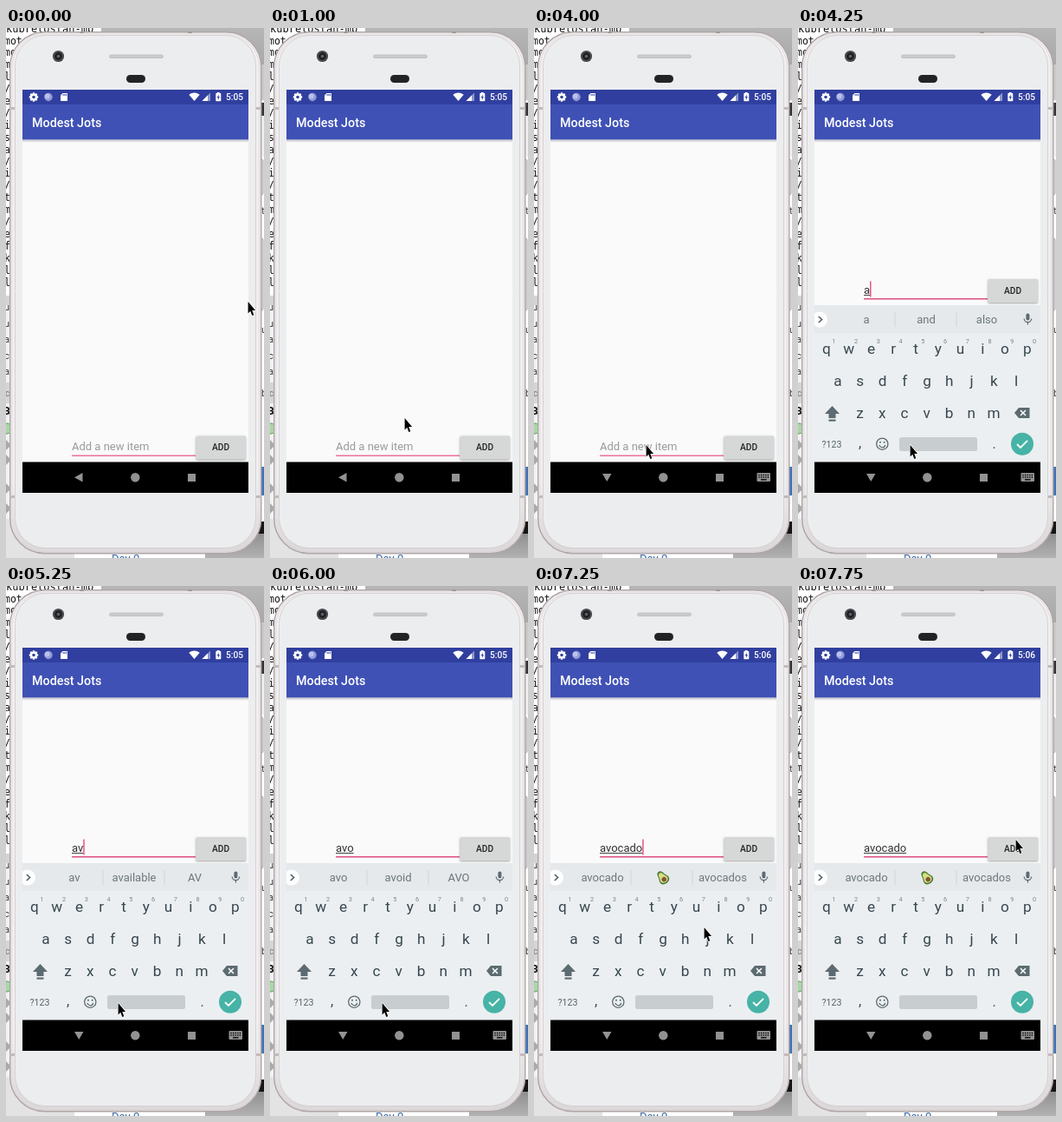
An HTML page with a canvas that plays this animation: 298x610 px, repeating every 8000 ms.

```html
<!DOCTYPE html>
<html lang="en">
<head>
<meta charset="utf-8">
<title>Phone typing demo</title>
<style>
html, body { margin: 0; width: 100%; height: 100%; overflow: hidden; background: #fff; }
canvas { display: block; width: 298px; height: 610px; }
</style>
</head>
<body>
<canvas id="stage" width="298" height="610"></canvas>
<script>
const ctx = document.getElementById('stage').getContext('2d');
const LOOP = 8000;
const SANS = 'Roboto, sans-serif';
const MONO = '"DejaVu Sans Mono", monospace';

// [start ms, tip x, tip y]
const POINTER = [
  [0, 279, 314], [250, 257, 351], [500, 197, 401], [1000, 155, 448],
  [1250, 138, 480], [1500, 129, 481], [1750, 129, 479],
  [7250, 196, 392], [7500, 243, 298], [7750, 251, 291]
];
// [start ms, typed text, middle suggestion, right suggestion]
const TYPING = [
  [4250, 'a', 'and', 'also'], [5250, 'av', 'available', 'AV'],
  [5500, 'avo', 'avoid', 'AVO'], [6250, 'avoca', 'avocados', 'avocado'],
  [6500, 'avocad', 'avocado', 'avocados'], [7000, 'avocado', '', 'avocados']
];

const at = (list, t) => list.filter(step => step[0] <= t).pop();

function rect(x, y, w, h, fill) {
  ctx.fillStyle = fill;
  ctx.fillRect(x, y, w, h);
}

function round(x, y, w, h, r, fill, stroke, width = 1) {
  ctx.beginPath();
  ctx.roundRect(x, y, w, h, r);
  paint(fill, stroke, width);
}

function disc(x, y, r, fill, stroke, width = 1) {
  ctx.beginPath();
  ctx.arc(x, y, r, 0, Math.PI * 2);
  paint(fill, stroke, width);
}

function path(points, fill, stroke, width = 1, close = true) {
  ctx.beginPath();
  points.forEach(([x, y]) => ctx.lineTo(x, y));
  if (close) ctx.closePath();
  paint(fill, stroke, width);
}

function paint(fill, stroke, width) {
  if (fill) { ctx.fillStyle = fill; ctx.fill(); }
  if (stroke) { ctx.strokeStyle = stroke; ctx.lineWidth = width; ctx.stroke(); }
}

function text(str, x, y, size, fill, align = 'left', weight = 400, family = SANS) {
  ctx.font = `${weight} ${size}px ${family}`;
  ctx.textAlign = align;
  ctx.fillStyle = fill;
  ctx.fillText(str, x, y);
}

function shade(y, h, from, to) {
  const g = ctx.createLinearGradient(0, y, 0, y + h);
  g.addColorStop(0, from);
  g.addColorStop(1, to);
  return g;
}

function desktop() {
  rect(0, 0, 298, 610, '#fff');

  // left: terminal, then panels
  text('kubrelostan-mp', 0, 5, 12, '#111', 'left', 400, MONO);
  'mote,mo,mo,lo,/d,er,/l,il,st,al,/d,it,/e,ta,mo,/b,el,fi,ke,le,lo'.split(',')
    .forEach((s, i) => text(s, -2, 18.5 + i * 13.9, 11.5, '#111', 'left', 400, MONO));
  rect(0, 308, 12, 11, '#d4d4d4');
  rect(0, 319, 12, 291, '#f3f3f3');
  ['ui', 'ui', 'a', 'c', 'a'].forEach((s, i) => text(s, -2, 325 + i * 18.5, 11, '#333'));
  rect(0, 408, 12, 24, '#d6d6d6');
  text('c', -1, 424, 10, '#777');
  text('B', -3, 445, 12, '#111', 'left', 700);
  disc(1, 461, 6, '#a9d7a5', '#54a355');
  [480, 497, 530, 553].forEach(y => path([[0, y - 6], [6, y], [0, y + 6]], '#aaa'));
  rect(0, 565, 79, 45, '#e3e3e3');

  // right: window edges
  rect(110, 0, 188, 42, shade(0, 42, '#b6b6b6', '#a8a8a8'));
  rect(288, 42, 10, 41, '#c9c9c9');
  rect(295, 86, 3, 15, '#333');
  rect(290, 102, 8, 46, '#f1f1f1');
  text('t', 295, 214, 11, '#444');
  text('u', 295, 351, 11, '#333');
  text('b', 295, 424, 11, '#333');
  rect(293, 505, 5, 33, '#3f72b5');
  rect(288, 568, 10, 14, '#151515');
  rect(230, 582, 68, 28, shade(582, 28, '#8f8f8f', '#b2b2b2'));
  text('Day 0', 122, 615, 13, '#3b69a5');
}

function phone() {
  round(291, 151, 6, 41, 2, '#d9d9dc', '#aaa6a8');
  round(291, 242, 6, 83, 2, '#d9d9dc', '#aaa6a8');
  round(4.7, 4.7, 290, 600, 40, shade(520, 85, '#f1eff0', '#d9d5d7'), '#b0a6a8', 1.5);
  round(7, 7, 285.4, 594, 38, null, '#e2dddf');
  round(10.5, 8.5, 278, 590, 35, '#ecedef', '#d6d1d4');
  [85, 210].forEach(x => rect(x, 4, 5, 2, '#a29a9b'));
  [91, 538].forEach(y => {
    rect(4, y, 6, 3, '#c2babc');
    rect(289, y, 6, 3, '#c2babc');
  });

  disc(60.5, 32.5, 6.6, '#4a4a4c');
  disc(60.5, 32.5, 4.4, '#202124');
  disc(60.5, 32.5, 1.8, '#5d6370');
  round(119.5, 31, 62, 3.5, 1.75, '#cacbce', '#bcbcbf', 0.8);
  round(139, 54, 22, 9, 4.5, '#222325');
}

function gear(x, y) {
  ctx.save();
  ctx.translate(x, y);
  ctx.fillStyle = '#fff';
  for (let i = 0; i < 8; i++) {
    ctx.rotate(Math.PI / 4);
    ctx.fillRect(-1.2, -5.2, 2.4, 3);
  }
  ctx.restore();
  disc(x, y, 2.9, null, '#fff', 2.2);
}

function statusBar(clock) {
  rect(19, 71, 261, 17, '#303f9f');
  gear(32, 79.5);
  disc(49, 79.5, 4.7, '#8f9ad6');
  disc(47.7, 78.4, 3, '#b9c1ea');
  path([[65.5, 75], [71, 75], [71, 84], [63, 84], [63, 77.5]], '#fff');
  [65.6, 67.4, 69.2].forEach(x => rect(x, 76, 0.9, 2, '#303f9f'));

  ctx.beginPath();
  ctx.moveTo(217.5, 84);
  ctx.lineTo(211.3, 76.7);
  ctx.quadraticCurveTo(217.5, 72.2, 223.7, 76.7);
  ctx.closePath();
  paint('#fff');
  path([[236, 74.5], [236, 84], [226.5, 84]], '#8f98cd');
  path([[233, 77.5], [233, 84], [226.5, 84]], '#fff');
  rect(243.7, 74, 3, 2, '#fff');
  round(242.3, 75, 6, 9.2, 0.8, '#fff');
  path([[245.8, 76.5], [243.6, 80.2], [245, 80.2], [244.8, 83], [247, 79.2], [245.6, 79.2]], '#303f9f');
  text(clock, 274, 83, 10.2, '#fff', 'right', 500);
}

function toolbar() {
  rect(19, 128, 261, 4, shade(128, 4, '#b9bac4', '#fafafa'));
  rect(19, 88, 261, 40.3, '#3f51b5');
  text('Modest Jots', 30, 114, 14.3, '#fff', 'left', 500);
}

function inputRow(y, typed, caret) {
  let end = 76;
  if (typed) {
    text(typed, 76, y + 15, 13, '#333');
    end += ctx.measureText(typed).width;
    rect(76, y + 16.5, end - 76, 1, '#444');
  } else {
    text('Add a new item', 76, y + 15, 13, '#9b9b9b');
  }
  rect(76, y + 20.5, 143, 1.5, typed ? '#dc4f82' : '#ee70a0');
  if (caret) rect(end, y + 1, 1.4, 18, '#e8487f');

  ctx.save();
  ctx.shadowColor = 'rgba(0,0,0,.35)';
  ctx.shadowBlur = 2.5;
  ctx.shadowOffsetY = 1;
  round(219.5, y - 1.5, 57.5, 27, 1.5, '#d6d7d7');
  ctx.restore();
  text('ADD', 248, y + 15.2, 10.2, '#222', 'center', 500);
}

function navBar(keyboardUp) {
  const gray = '#929292';
  rect(19, 499.5, 261, 35.5, '#000');
  if (keyboardUp) path([[79, 513], [89.5, 513], [84.2, 522]], gray);
  else path([[88.5, 512], [88.5, 522.5], [79, 517.2]], gray);
  disc(149.3, 517.2, 5.2, gray);
  rect(210, 513, 9, 9, gray);
  if (!keyboardUp) return;
  round(257.5, 512, 15.5, 10, 1, gray);
  for (let i = 0; i < 5; i++) {
    rect(259.3 + i * 2.6, 513.8, 1.4, 1.4, '#000');
    rect(259.3 + i * 2.6, 516.3, 1.4, 1.4, '#000');
  }
  rect(262, 519.2, 6.6, 1.3, '#000');
}

function keyRow(keys, x, y) {
  [...keys].forEach((k, i) => text(k, x + i * 25.75, y, 17.2, '#37474f', 'center'));
}

function avocado(x, y) {
  ctx.save();
  ctx.translate(x, y);
  ctx.rotate(-0.65);
  const pear = (s, fill) => {
    ctx.beginPath();
    ctx.moveTo(0, -8 * s);
    ctx.bezierCurveTo(4 * s, -8 * s, 3 * s, -3 * s, 5 * s, 0);
    ctx.bezierCurveTo(9 * s, 9 * s, -9 * s, 9 * s, -5 * s, 0);
    ctx.bezierCurveTo(-3 * s, -3 * s, -4 * s, -8 * s, 0, -8 * s);
    paint(fill);
  };
  pear(1.08, '#4c7a32');
  pear(0.84, '#d4df83');
  disc(0, 2, 2.7, '#855338');
  ctx.restore();
}

function suggestions(left, mid, right) {
  const ink = '#6c777c';
  rect(19, 319, 261, 32, '#e5e9eb');
  disc(25, 335.5, 9, '#fff');
  path([[23.8, 332], [27.6, 335.5], [23.8, 339]], null, '#455a64', 1.5, false);
  rect(111.5, 327, 1, 17, '#d0d5d8');
  rect(182.5, 327, 1, 17, '#d0d5d8');
  text(left, 79, 340, 13, ink, 'center');
  if (mid) text(mid, 148, 340, 13, ink, 'center');
  else avocado(149, 336);
  text(right, 218, 340, 13, ink, 'center');

  round(263.4, 328.5, 4, 8, 2, '#5f6b70');
  ctx.beginPath();
  ctx.arc(265.4, 334.5, 4.2, 0, Math.PI);
  paint(null, '#5f6b70', 1.2);
  rect(264.8, 338.5, 1.2, 3, '#5f6b70');
}

function keyboard(words) {
  const ink = '#5c6a71';
  rect(19, 319, 261, 181, '#eceff1');
  ctx.save();
  ctx.beginPath();
  ctx.rect(19, 319, 261, 181);
  ctx.clip();
  suggestions(...words);
  ctx.restore();

  keyRow('qwertyuiop', 33, 375);
  [...'1234567890'].forEach((n, i) => text(n, 41.3 + i * 25.75, 363, 7.3, '#78868d', 'center'));
  keyRow('asdfghjkl', 46, 412);
  keyRow('zxcvbnm', 71.5, 448.5);

  path([[39.5, 435], [48, 444], [43.5, 444], [43.5, 449], [35.5, 449], [35.5, 444], [31, 444]], ink);
  rect(35.5, 450.5, 8, 2.2, ink);
  path([[250, 443], [255, 437], [267.5, 437], [267.5, 449], [255, 449]], ink);
  path([[257, 440], [263, 446]], null, '#fff', 1.5, false);
  path([[263, 440], [257, 446]], null, '#fff', 1.5, false);

  text('?123', 39, 483, 10.6, '#546269', 'center');
  text(',', 71.5, 483, 16, '#37474f', 'center');
  disc(97.3, 478.7, 6.6, null, ink, 1.3);
  disc(95, 476.8, 1, ink);
  disc(99.6, 476.8, 1, ink);
  ctx.beginPath();
  ctx.arc(97.3, 479.4, 3.4, 0.15, Math.PI - 0.15);
  paint(null, ink, 1.2);
  round(117, 471, 90, 16, 2.5, '#c8cdd0');
  text('.', 226.5, 484, 16, '#37474f', 'center');
  disc(259, 478.7, 13, '#46b3a6');
  path([[253, 479], [257, 483], [265, 474.8]], null, '#fff', 1.8, false);
}

function pointer(x, y) {
  const shape = [[0, 0], [0, 13.5], [2.7, 10.8], [4.7, 16], [6.7, 15.2], [4.7, 10], [8.5, 10]];
  ctx.save();
  ctx.translate(x + 0.6, y + 1);
  ctx.lineJoin = 'round';
  path(shape, '#000', '#fff', 1.5);
  path(shape, '#000');
  ctx.restore();
}

function caretOn(t) {
  if (t < 4250) return Math.floor(t / 500) % 2 === 1;
  return !((t >= 4500 && t < 5000) || (t >= 6000 && t < 6250) || t >= 7500);
}

function draw(t) {
  const step = at(TYPING, t);
  const [, x, y] = at(POINTER, t);
  desktop();
  phone();
  rect(19, 71, 261, 464, '#fafafa');
  statusBar(t < 7250 ? '5:05' : '5:06');
  toolbar();
  inputRow(step ? 290.5 : 471, step && step[1], caretOn(t));
  if (step) keyboard(step.slice(1));
  navBar(t >= 4000);
  pointer(x, y);
}

const start = performance.now();
function tick() {
  draw((performance.now() - start) % LOOP);
  requestAnimationFrame(tick);
}
tick();
</script>
</body>
</html>
```
